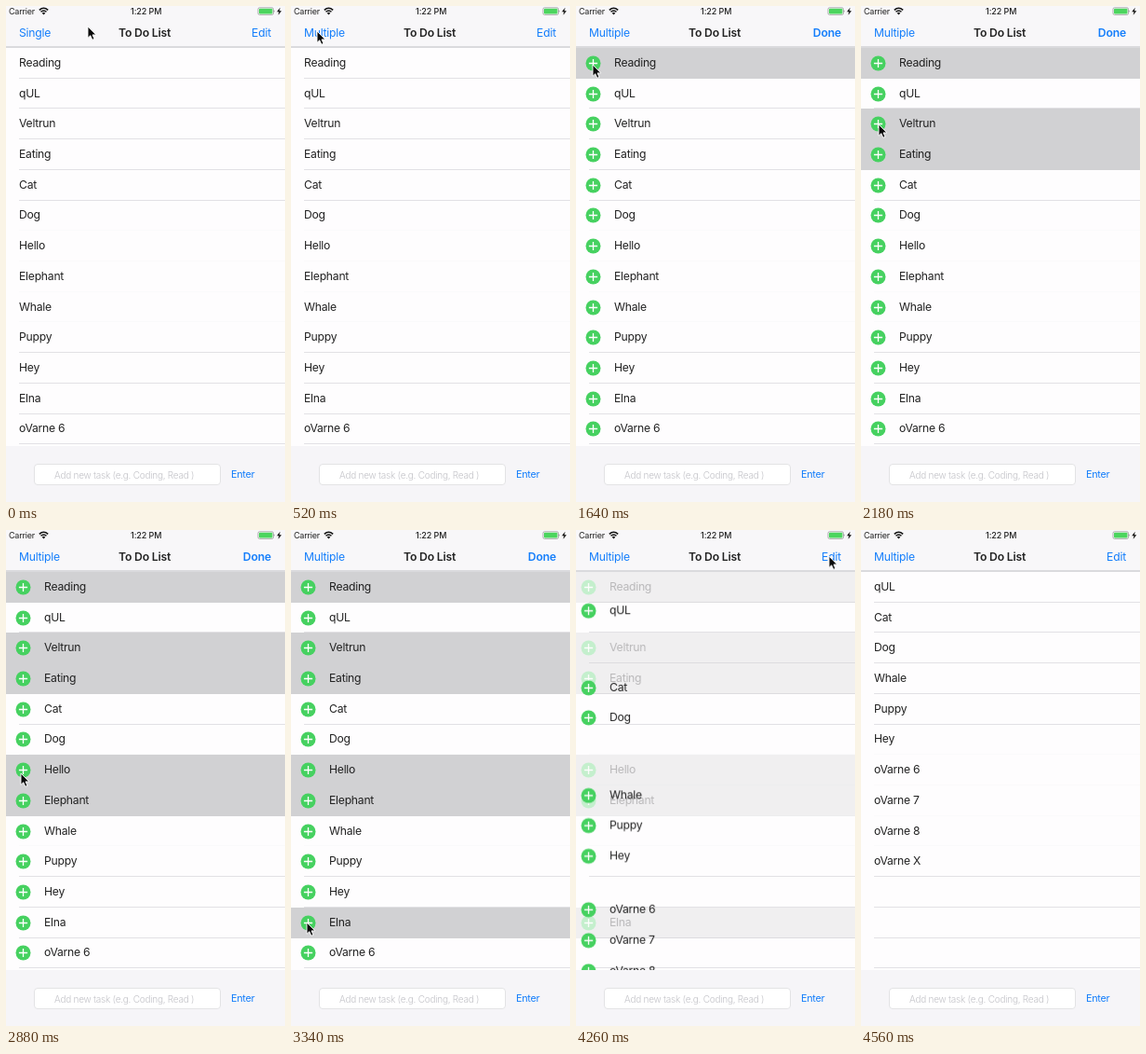
Recreate the animation shown at these times as an HTML page. Size 300x532 px, loop 5000 ms.

```html
<!DOCTYPE html>
<html lang="en">
<head>
<meta charset="utf-8">
<title>To Do List</title>
<style>
  html, body { margin: 0; width: 100%; height: 100%; overflow: hidden; background: #fff; }
  #stage { position: relative; width: 300px; height: 532px; overflow: hidden; background: #fefdfe;
    font: 12.2px/16px Inter, "Open Sans", sans-serif; letter-spacing: -.25px; color: #222; white-space: pre; }
  #stage div, #stage span, #stage svg { position: absolute; }
  #bar { left: 0; top: 0; width: 300px; height: 43px; background: #f8f7f9; border-bottom: 2px solid #dadadd; }
  #list { left: 0; top: 0; width: 300px; height: 472px; overflow: hidden; }
  .line { left: 14px; width: 286px; height: 1px; background: #e2e1e5; }
  .faint { background: #fafafb; }
  .row { left: 0; width: 300px; height: 33px; }
  .mark { inset: 0; background: #d1d1d3; opacity: 0; }
  .slide { left: 0; top: 0; }
  .slide span { left: 14px; top: 8px; }
  .slide svg { left: -17.5px; top: 8px; }
  .link { color: #147efb; top: 21px; }
  .bold { font-weight: 600; letter-spacing: -.18px; }
  .small { font-size: 9px; line-height: 12px; top: 0; letter-spacing: -.2px; }
  #foot { left: 0; top: 472px; width: 300px; height: 60px; background: #f6f5f8; }
  #field { left: 30px; top: 19px; width: 199px; height: 21px; border: 1px solid #e3e3e5; border-radius: 4px; background: #fff; }
  #field span { left: 21px; top: 3px; font-size: 10px; font-weight: 300; color: #c3c3c8; }
  #edit { left: 264px; letter-spacing: -.15px; }
  #enter { left: 242px; top: 23px; font-size: 10.8px; }
</style>
</head>
<body>
<div id="stage">
  <div id="list"></div>
  <div id="bar">
    <span class="small" style="left:3px">Carrier</span>
    <svg style="left:35px;top:1px" width="11" height="9" viewBox="0 0 11 9" fill="none" stroke="#111" stroke-width="1.5">
      <path d="M.8 3.4Q5.5-.9 10.2 3.4M2.5 5.3Q5.5 2.6 8.5 5.3"/><path d="M3.7 6.5Q5.5 5 7.3 6.5L5.5 8.5Z" fill="#111" stroke="none"/>
    </svg>
    <span class="small" style="left:134px;font-weight:500;letter-spacing:-.1px">1:22 PM</span>
    <svg style="left:270px;top:1px" width="28" height="10" viewBox="0 0 28 10">
      <rect x="1" y=".8" width="16.5" height="7.6" rx="1.6" fill="#fff" stroke="#8b8b8d" stroke-width=".7"/>
      <rect x="2" y="1.8" width="14.5" height="5.6" rx=".8" fill="#4cd55f"/>
      <path d="M18.4 3.3q1.4 1.3 0 2.6z" fill="#8b8b8d"/>
      <path d="M24.8.7L21.2 5.2h2.3l-.8 3.6 3.6-4.6H24z" fill="#111"/>
    </svg>
    <span id="single" class="link" style="left:14px">Single</span>
    <span id="multiple" class="link" style="left:14px">Multiple</span>
    <span class="bold" style="left:121px;top:21px">To Do List</span>
    <span id="edit" class="link">Edit</span>
    <span id="done" class="link bold" style="right:15px">Done</span>
  </div>
  <div id="foot">
    <div id="field"><span>Add new task (e.g. Coding, Read )</span></div>
    <span id="enter" class="link">Enter</span>
  </div>
  <svg id="cursor" style="left:-1px;top:-1px" width="13" height="18" viewBox="-1 -1 13 18">
    <path d="M0 0V12.3L2.8 9.7L4.8 14.3L7 13.3L5 8.9H8.8Z" fill="#0a0a0a" stroke="#fff" stroke-width=".9"/>
  </svg>
</div>
<script>
const LOOP = 5000, ROW = 32.72;
const EDIT_ON = 840, EDIT_OFF = 4120, REMOVED = 4500;
const names = ["Reading", "qUL", "Veltrun", "Eating", "Cat", "Dog", "Hello", "Elephant", "Whale", "Puppy",
  "Hey", "Elna", "oVarne 6", "oVarne 7", "oVarne 8", "oVarne X"];
const picked = { Reading: 1480, Eating: 1840, Veltrun: 2060, Elephant: 2500, Hello: 2700, Elna: 3260 };
const $ = id => document.getElementById(id);
const rowTop = i => Math.round(44.8 + i * ROW);
const lineTop = i => Math.round(44 + i * ROW);

// Each step is [time in ms, style, easing towards the next step].
function track(el, steps) {
  const all = [[0, steps[0][1]], ...steps, [LOOP, steps[steps.length - 1][1]]];
  el.animate(all.map(([ms, style, easing = "linear"]) => ({ ...style, easing, offset: ms / LOOP })),
    { duration: LOOP, iterations: Infinity });
}

function show(el, from, to) {
  const steps = [];
  if (from > 0) steps.push([0, { opacity: 0 }, "steps(1, end)"]);
  steps.push([from, { opacity: 1 }, "steps(1, end)"]);
  if (to < LOOP) steps.push([to, { opacity: 0 }]);
  track(el, steps);
}

const move = (x, y) => ({ transform: `translate(${x}px, ${y}px)` });

function add(parent, className, html = "") {
  const el = document.createElement("div");
  el.className = className;
  el.innerHTML = html;
  parent.append(el);
  return el;
}

const list = $("list");
for (let i = 1; i <= 13; i++) {
  const line = add(list, i > 5 && i < 10 ? "line faint" : "line");
  line.style.top = lineTop(i) + "px";
}

const plus = `<svg width="17" height="17" viewBox="-8.5 -8.5 17 17">
  <circle r="8" fill="#46d160"/><path d="M-4.6 0H4.6M0-4.6V4.6" stroke="#fff" stroke-width="1.3"/></svg>`;

let gone = 0;
names.forEach((name, i) => {
  const row = add(list, "row");
  row.style.top = rowTop(i) + "px";
  const mark = add(row, "mark");
  const slide = add(row, "slide", `${plus}<span>${name}</span>`);

  track(slide, [
    [EDIT_ON, move(0, 0), "ease-in-out"], [1070, move(27, 0)],
    [EDIT_OFF + 40, move(27, 0), "ease-in-out"], [REMOVED, move(0, 0)]
  ]);
  if (name in picked) {
    gone++;
    track(mark, [[picked[name], { opacity: 0 }], [picked[name] + 60, { opacity: 1 }]]);
    track(row, [[EDIT_OFF + 20, { opacity: 1 }, "ease-out"], [EDIT_OFF + 260, { opacity: 0 }]]);
  } else {
    const shift = rowTop(i - gone) - rowTop(i);
    track(row, [[EDIT_OFF + 20, move(0, 0), "ease-in-out"], [REMOVED, move(0, shift)]]);
  }
});

show($("single"), 0, 400);
show($("multiple"), 400, LOOP);
show($("done"), EDIT_ON, EDIT_OFF);
track($("edit"), [
  [0, { opacity: 1 }, "steps(1, end)"], [EDIT_ON, { opacity: 0 }, "steps(1, end)"], [EDIT_OFF, { opacity: 1 }]
]);

const path = [
  [0, 88, 22], [300, 28, 27], [560, 28, 27], [800, 275, 25], [1110, 275, 25], [1440, 18, 63],
  [1640, 18, 63], [1800, 18, 160], [1900, 18, 160], [2040, 19, 127], [2280, 19, 127], [2460, 17, 291],
  [2560, 17, 291], [2680, 16, 261], [2890, 16, 261], [3200, 17, 421], [3480, 17, 421],
  [3880, 265, 60], [4020, 269, 27], [4220, 269, 27], [4420, 304, 40]
];
track($("cursor"), path.map(([ms, x, y]) => [ms, move(x, y), "ease-in-out"]));
</script>
</body>
</html>
```
